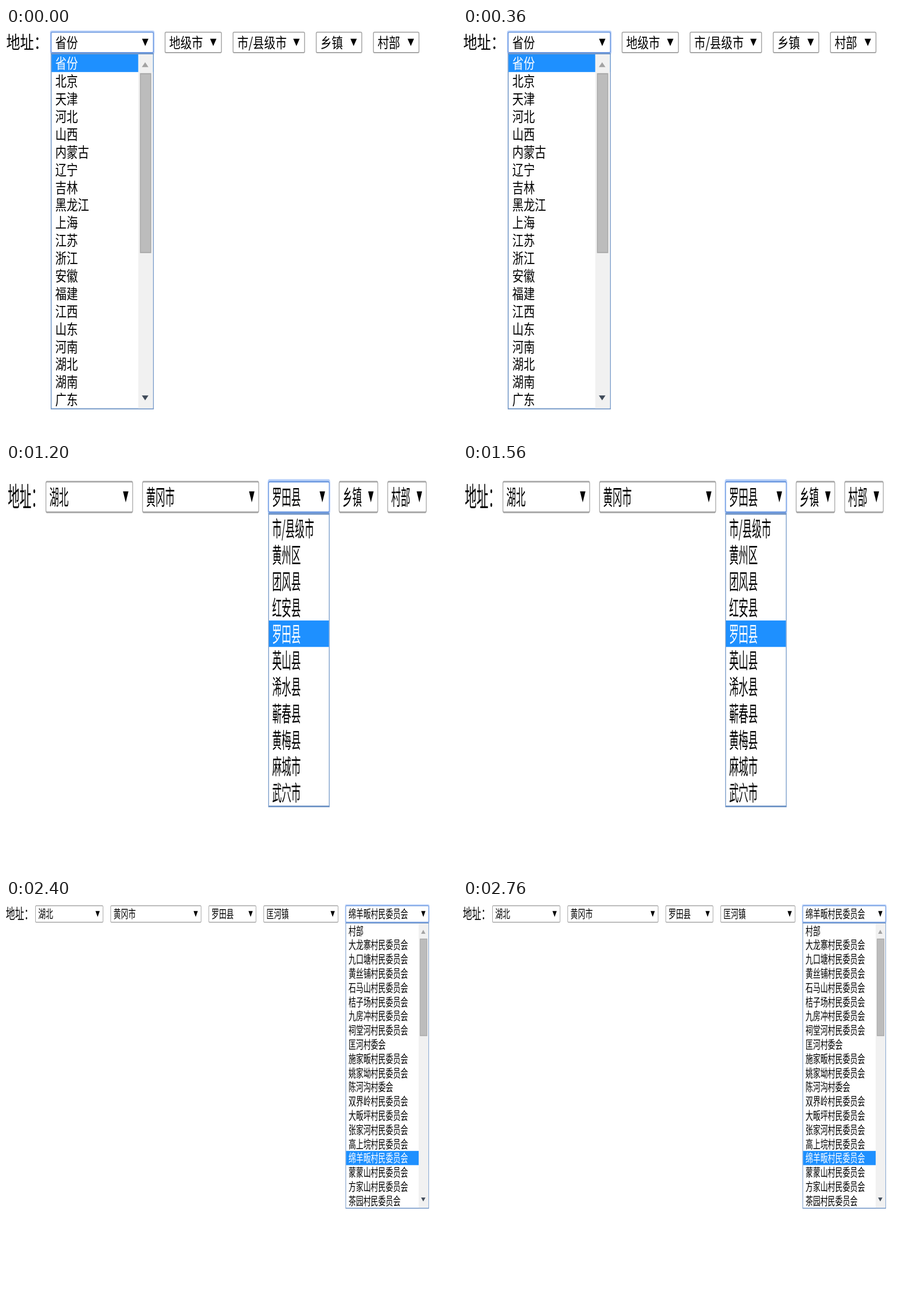
An HTML page that plays this animation: 787x712 px, repeating every 3000 ms.

```html
<!DOCTYPE html>
<html lang="zh-CN">
<head>
<meta charset="utf-8">
<style>
  html, body { margin: 0; width: 100%; height: 100%; overflow: hidden; background: #fff; }
  svg { display: block; }
  text { font: 13px "Noto Sans CJK SC", "Noto Sans CJK", sans-serif; white-space: pre; }
  .label { font-size: 16px; }
</style>
</head>
<body>
<svg id="stage" width="787" height="712" viewBox="0 0 787 712"></svg>
<script>
const HOLD = 600, GAP = 12.5, BOX_H = 19.5, ROW = 16, LIST_Y = 20.5, BAR = 17;
const words = s => s.replace(/\*/g, '村民委员会').split(' ');

// Each scene: origin and scale of the form, box widths and values, the open list.
const scenes = [
  { x: 78, y: 6.4, sx: 1.512, sy: 1.93, widths: [119, 66, 83.5, 53.5, 53.5],
    values: words('省份 地级市 市/县级市 乡镇 村部'), open: 0, thumb: 162.7,
    list: words('省份 北京 天津 河北 山西 内蒙古 辽宁 吉林 黑龙江 上海 江苏 浙江 安徽 福建 江西 山东 河南 湖北 湖南 广东') },
  { x: 70, y: 17.2, sx: 1.35, sy: 2.36, widths: [119, 159, 83.5, 53.5, 53.5],
    values: words('湖北 地级市 市/县级市 乡镇 村部'), open: 1,
    list: words('地级市 武汉市 黄石市 十堰市 宜昌市 襄阳市 鄂州市 荆门市 孝感市 荆州市 黄冈市 咸宁市 随州市 恩施土家族苗族自治州 省直辖县级行政区划') },
  { x: 69, y: 29.4, sx: 1.2826, sy: 2.884, widths: [119, 159, 83.5, 53.5, 53.5],
    values: words('湖北 黄冈市 罗田县 乡镇 村部'), open: 2,
    list: words('市/县级市 黄州区 团风县 红安县 罗田县 英山县 浠水县 蕲春县 黄梅县 麻城市 武穴市') },
  { x: 57, y: 22.5, sx: 1.099, sy: 1.863, widths: [119, 159, 83.5, 131, 53.5],
    values: words('湖北 黄冈市 罗田县 匡河镇 村部'), open: 3, topEdge: true,
    list: words('乡镇 凤山镇 骆驼坳镇 大河岸镇 九资河镇 胜利镇 河铺镇 三里畈镇 匡河镇 白莲河乡 白庙河乡 平湖乡 大崎乡 罗田县经济开发区 青苔关林场 天堂寨林场 薄刀峰林场 黄狮寨林场') },
  { x: 51, y: 9.3, sx: 0.998, sy: 1.55, widths: [119, 159, 83.5, 131, 146],
    values: words('湖北 黄冈市 罗田县 匡河镇 绵羊畈*'), open: 4, thumb: 109.7,
    list: words('村部 大龙寨* 九口塘* 黄丝铺* 石马山* 桔子场* 九房冲* 祠堂河* 匡河村委会 施家畈* 姚家坳* 陈河沟村委会 双界岭* 大畈坪* 张家河* 高上垸* 绵羊畈* 蒙蒙山* 方家山* 茶园*') }
];

const rect = (x, y, w, h, fill, extra = '') =>
  `<rect x="${x}" y="${y}" width="${w}" height="${h}" fill="${fill}" ${extra}/>`;
const text = (x, y, s, fill = '#000', cls = '') =>
  `<text x="${x}" y="${y}" fill="${fill}" class="${cls}">${s}</text>`;
const triangle = (x, y, halfW, h, fill) =>
  `<path d="M${x - halfW} ${y - h / 2}h${2 * halfW}l${-halfW} ${h}z" fill="${fill}"/>`;

function selectBox(x, w, value, focused) {
  const glow = focused
    ? rect(x - 0.3, -0.5, w + 0.6, BOX_H + 0.8, 'none', 'rx="1.5" stroke="#a3c2f8" stroke-opacity=".8"') : '';
  return glow
    + rect(x + 0.5, 0.5, w - 1, BOX_H - 1, '#fff', `rx="1.2" stroke="${focused ? '#6a97e0' : '#a6a6a6'}"`)
    + text(x + 5.3, 14.9, value)
    + triangle(x + w - 9.9, 9.7, 3.7, 6.6, '#000');
}

function scrollbar(x, h, thumb) {
  return rect(x, LIST_Y, BAR, h, '#f1f1f1')
    + rect(x + 2.5, LIST_Y + BAR + 0.5, 12, thumb - 1, '#bcbcbc', 'stroke="#a8a8a8"')
    + triangle(x + 8, LIST_Y + 9.3, 3.8, -4.4, '#a3a3a3')
    + triangle(x + 8, LIST_Y + h - 9.3, 3.8, 4.4, '#3f4a58');
}

function dropdown(x, w, { list, values, open, thumb }) {
  const h = list.length * ROW;
  const rows = list.map((item, i) => {
    const y = LIST_Y + i * ROW, on = item === values[open];
    return (on ? rect(x + 1, y, w - 2, ROW, '#1e90ff') : '')
      + text(x + 5.3, y + 13.2, item, on ? '#fff' : '#000');
  }).join('');
  return rect(x + 0.5, LIST_Y - 0.5, w - 1, h + 1, '#fff', 'stroke="#7095c6"')
    + rows + (thumb ? scrollbar(x + w - 1 - BAR, h, thumb) : '');
}

function sceneMarkup(s) {
  let x = 0, boxes = '', menu = '';
  s.widths.forEach((w, i) => {
    boxes += selectBox(x, w, s.values[i], i === s.open);
    if (i === s.open) menu = dropdown(x, w, s);
    x += w + GAP;
  });
  const edge = s.topEdge ? rect(0, 0, 787, 2, '#e8e8e8') + rect(0, 2, 787, 1.7, '#a9a9a9') : '';
  return `<g visibility="hidden">${edge}<g transform="translate(${s.x} ${s.y}) scale(${s.sx} ${s.sy})">`
    + text(-51.3, 15.4, '地址：', '#000', 'label') + boxes + menu + '</g></g>';
}

const stage = document.getElementById('stage');
stage.innerHTML = scenes.map(sceneMarkup).join('');

function draw() {
  const current = Math.floor(performance.now() / HOLD) % scenes.length;
  [...stage.children].forEach((g, i) =>
    g.setAttribute('visibility', i === current ? 'visible' : 'hidden'));
  requestAnimationFrame(draw);
}
draw();
</script>
</body>
</html>
```
